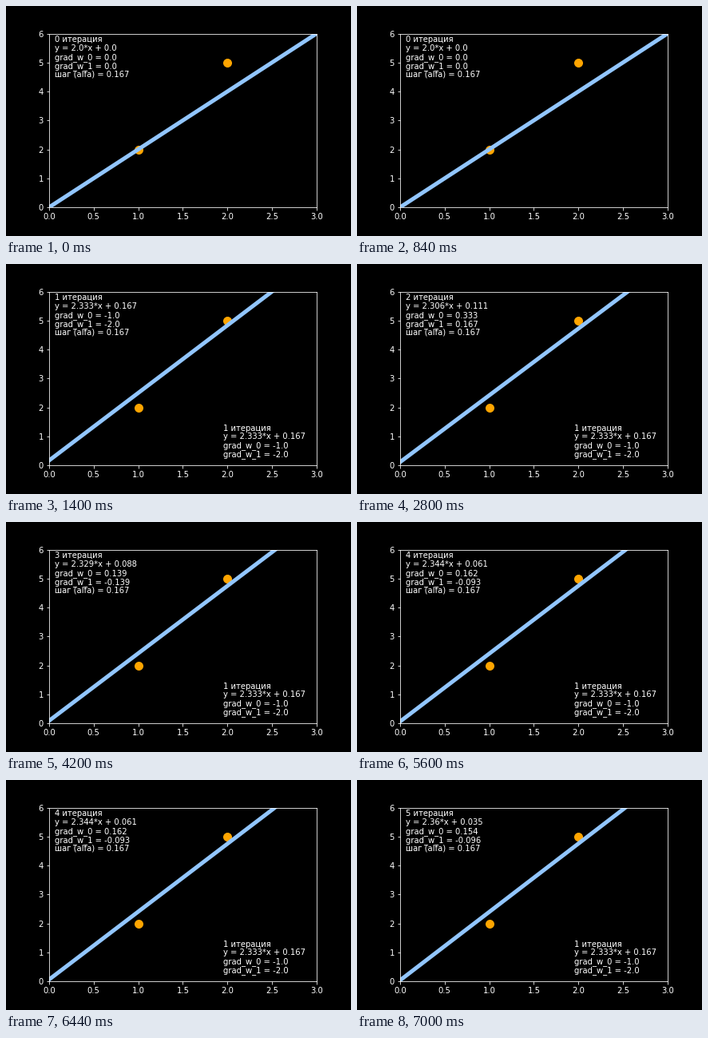
A matplotlib script that plays this animation: 432 by 288 pixels, repeating every 8 s.

```python
import matplotlib.pyplot as plt
from matplotlib.animation import FuncAnimation

POINTS = [(1, 2), (2, 5)]
ALPHA = 1 / 6
TICK_MS = 200
HOLD = 7        # ticks per iteration
TICKS = 40


def descend(count):
    """Gradient descent for y = w1*x + w0; yields (w0, w1, g0, g1)."""
    w0, w1, g0, g1 = 0.0, 2.0, 0.0, 0.0
    steps = [(w0, w1, g0, g1)]
    for _ in range(count):
        errors = [(x, w1 * x + w0 - y) for x, y in POINTS]
        g0 = sum(e for _, e in errors)
        g1 = sum(e * x for x, e in errors)
        w0 -= ALPHA * g0
        w1 -= ALPHA * g1
        steps.append((w0, w1, g0, g1))
    return steps


STEPS = descend(5)


def describe(i):
    w0, w1, g0, g1 = (round(v, 3) for v in STEPS[i])
    return [f"{i} итерация", f"y = {w1}*x + {w0}",
            f"grad_w_0 = {g0}", f"grad_w_1 = {g1}"]


plt.rcParams.update({
    "font.family": "DejaVu Sans", "font.size": 10,
    "text.color": "white", "axes.edgecolor": "white",
    "xtick.color": "white", "ytick.color": "white",
})
fig, ax = plt.subplots(figsize=(6, 4), dpi=72, facecolor="black")
fig.subplots_adjust(left=0.125, right=0.9, bottom=0.125, top=0.88)
ax.set_facecolor("black")
ax.set_xlim(0, 3)
ax.set_ylim(0, 6)
ax.scatter(*zip(*POINTS), s=100, color="orange")
line, = ax.plot([], [], color="#92C6FF", linewidth=5)


def text_block(x, top, rows):
    return [ax.text(x, top - 0.3 * r, "") for r in range(rows)]


current = text_block(0.06, 5.7, 5)
first = text_block(1.95, 1.2, 4)


def fill(block, rows):
    for label, row in zip(block, rows):
        label.set_text(row)


def update(tick):
    i = tick // HOLD
    w0, w1 = STEPS[i][:2]
    line.set_data([0, 3], [w0, w0 + 3 * w1])
    fill(current, describe(i) + [f"шаг (alfa) = {round(ALPHA, 3)}"])
    fill(first, describe(1) if i else [""] * 4)
    return [line, *current, *first]


anim = FuncAnimation(fig, update, frames=TICKS, interval=TICK_MS,
                     init_func=lambda: update(0), repeat=True, repeat_delay=0)
plt.show()
```
